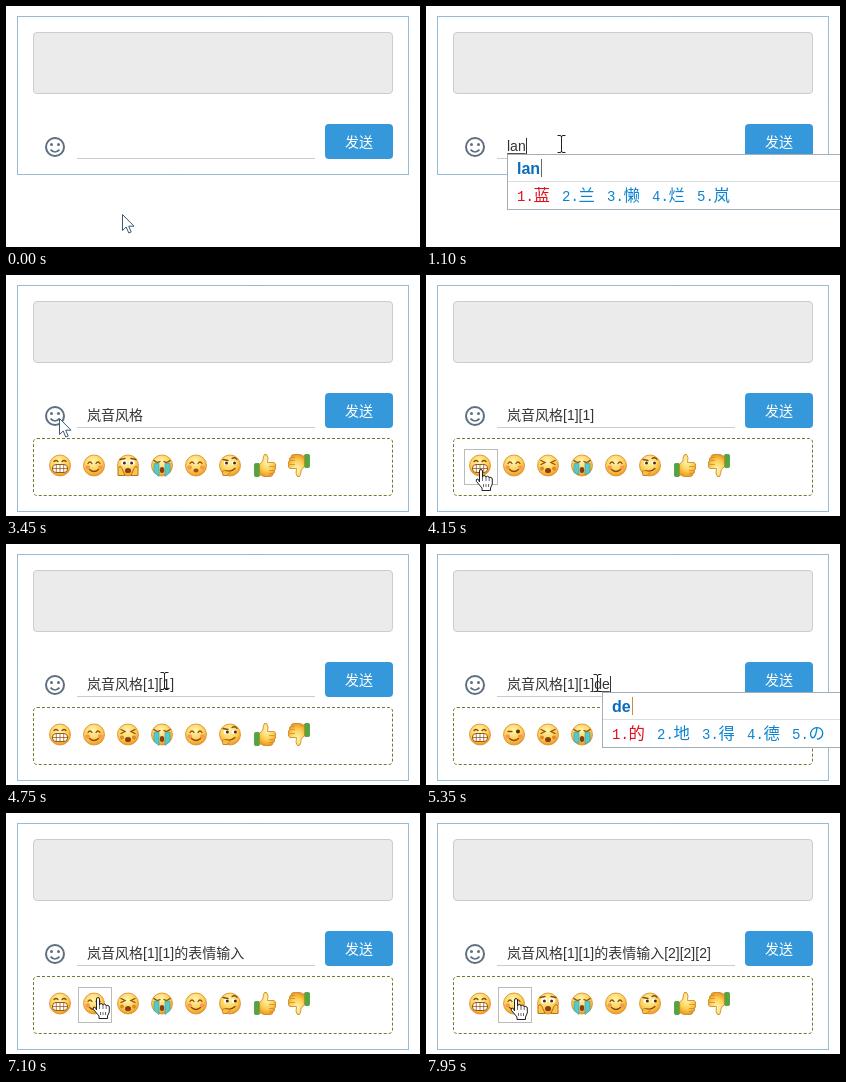
These frames come from a looping animation (414x241 px, 8 s). An HTML page:

```html
<!DOCTYPE html>
<html lang="zh-CN">
<head>
<meta charset="utf-8">
<style>
  html, body { margin: 0; width: 100%; height: 100%; overflow: hidden; background: #fff; }
  svg { display: block; width: 414px; height: 241px; }
  text { white-space: pre; }
  .input, .send { font: 14px "Liberation Sans", "Noto Sans CJK SC", "Noto Sans CJK", sans-serif; }
  .pinyin { font: bold 16px "Liberation Sans", sans-serif; fill: #0a6cbc; }
  .digit { font: 14px "Liberation Mono", monospace; }
  .word { font: 16.4px "Noto Sans CJK SC", "Noto Sans CJK", sans-serif; font-weight: 300; }
  .line { fill: none; stroke-linecap: round; stroke: #8a4b0c; stroke-width: 1.3; }
</style>
</head>
<body>
<svg viewBox="0 0 414 241" xmlns="http://www.w3.org/2000/svg">
  <defs>
    <radialGradient id="skin" cx="45%" cy="32%" r="68%">
      <stop offset="0" stop-color="#fff6b4"/>
      <stop offset=".6" stop-color="#fdd158"/>
      <stop offset="1" stop-color="#ed9a24"/>
    </radialGradient>
  </defs>
  <rect id="frame" x="11.5" y="10.5" width="391" fill="none" stroke="#2f77a8" stroke-dasharray="1 1"/>
  <rect x="27.5" y="26.5" width="359" height="61" rx="3.5" fill="#ebebeb" stroke="#ccc"/>
  <rect x="319" y="118" width="68" height="35" rx="4" fill="#3498db"/>
  <text class="send" x="339" y="141" fill="#fff">发送</text>
  <path d="M71 152.5H309" stroke="#ccc"/>
  <g transform="translate(49 141)" fill="none" stroke="#5d6f80" stroke-width="2">
    <circle r="9"/>
    <path d="M-4.5 2.6Q0 7.4 4.5 2.6" stroke-width="1.7"/>
    <g fill="#5d6f80" stroke="none"><circle cx="-3.5" cy="-2.5" r="1.5"/><circle cx="3.5" cy="-2.5" r="1.5"/></g>
  </g>
  <text id="typed" class="input" x="81" y="145" fill="#333"></text>
  <path id="underline" stroke="#555"/>
  <path id="caret" stroke="#333"/>
  <g id="panel">
    <rect x="27.5" y="163.5" width="359" height="57" rx="3.5" fill="none" stroke="#77772f" stroke-dasharray="3 2"/>
    <g id="faces"></g>
    <rect id="hover" y="174.5" width="33" height="35" fill="none" stroke="#777" stroke-dasharray="1 1"/>
  </g>
  <g id="ime">
    <rect x=".5" y="148.5" width="420" height="55" fill="#fff" stroke="#a3afb8"/>
    <path d="M1 175.5H420" stroke="#ddd"/>
    <text id="pinyin" class="pinyin" x="10" y="168"></text>
    <path id="imeCaret"/>
    <g id="words"></g>
  </g>
  <g id="cursor"></g>
</svg>
<script>
const LOOP = 8000, STEP = 50, PANEL_OPEN = 3300, CELL = 34;
const $ = id => document.getElementById(id);
const set = (id, attrs) => { for (const k in attrs) $(id).setAttribute(k, attrs[k]); };
const show = (id, on) => set(id, { display: on ? 'inline' : 'none' });

// Each phrase: spelling, first key, last key, commit time, popup position, candidates
const phrases = [
  { spell: "lan'yin", from: 950, to: 1300, done: 1400, x: 81, caret: '#667',
    first: '蓝 兰 懒 烂 岚', full: '岚音 兰因 蓝印 揽引 蓝银' },
  { spell: "feng'ge", from: 1450, to: 1800, done: 1950, x: 109, caret: '#6b5a8c',
    first: '风 封 峰 疯 丰', full: '风格 峰哥 锋哥 风哥 枫哥' },
  { spell: 'de', from: 5250, to: 5300, done: 5450, x: 176, caret: '#d08a3c',
    first: '的 地 得 德 の', full: '' },
  { spell: "biao'qing", from: 5500, to: 5900, done: 5980, x: 182, caret: '#667',
    first: '表 标 彪 飙 镖', full: '表情 标清 表请 彪清 标青' },
  { spell: "shu'ru", from: 6000, to: 6270, done: 6400, x: 210, caret: '#e02828',
    first: '数 书 树 输 属', full: '输入 数日 熟人 输热 书人' }
];
const commits = [[1400, '岚音'], [1950, '风格'], [3850, '[1]'], [4050, '[1]'], [5450, '的'],
  [5980, '表情'], [6400, '输入'], [7400, '[2]'], [7600, '[2]'], [7800, '[2]']];
const caretOn = [[450, 2350], [2850, 3300], [4850, 6200], [6300, 6850]];
const track = [[50, 116, 208], [300, 129, 150], [420, 135, 121], [650, 135, 138], [2450, 135, 138],
  [2950, 62, 147], [3100, 62, 147], [3200, 53, 143], [3500, 53, 143], [3700, 55, 194],
  [4250, 55, 194], [4450, 34, 150], [4600, 90, 129], [4800, 171, 139], [6500, 171, 139],
  [6800, 128, 160], [7150, 90, 185], [8000, 90, 185]];

function pointerAt(t) {
  const i = track.findIndex(k => k[0] > t);
  if (i <= 0) return track[i ? track.length - 1 : 0].slice(1);
  const [a, b] = [track[i - 1], track[i]];
  const p = (t - a[0]) / (b[0] - a[0]), e = p * p * (3 - 2 * p);
  return [1, 2].map(k => Math.round(a[k] + (b[k] - a[k]) * e));
}

const shapes = {
  arrow: '<path d="M.5 .5V16.5L4.2 13 6.8 19 9.2 18 6.7 12.2H12Z" fill="#fff" stroke="#3b5874"/>',
  beam: '<path d="M-3.5-8.5H-1Q.5-8.5.5-7Q.5-8.5 2-8.5H4.5M.5-7V7M-3.5 8.5H-1Q.5 8.5.5 7Q.5 8.5 2 8.5H4.5" fill="none" stroke="#222"/>',
  hand: '<path d="M-1.5 13V2Q-1.5.5 0 .5T1.5 2V8Q1.5 6.5 3.2 6.6T5 8.3Q5 7 6.6 7.2T8.2 9Q8.5 8 9.9 8.4T11.3 10V15L9.5 19V21.5H1V19L-4.5 12.5Q-5.5 10.6-4 10T-1.5 13Z" fill="#fff" stroke="#222" stroke-linejoin="round"/><path d="M1.5 8V12M5 8.5V12M8.2 9V12M2.5 15V18M5 15V18M7.5 15V18" stroke="#444" stroke-width=".8"/>'
};

const line = (d, extra = '') => `<path class="line" d="${d}" ${extra}/>`;
const dot = (x, y, r, fill) => `<circle cx="${x}" cy="${y}" r="${r}" fill="${fill}"/>`;
const pair = (x, y, r, fill) => dot(-x, y, r, fill) + dot(x, y, r, fill);
const ball = `<circle r="10.5" fill="url(#skin)" stroke="#d98a20" stroke-width=".8"/>`;
const blush = pair(6.3, 2, 2.3, '#f59a55');
const closedEyes = line('M-6-2Q-4-5-2-2M2-2Q4-5 6-2');
const smile = line('M-4.5 4Q0 8 4.5 4');

const faces = [
  () => ball + line('M-6-4Q-4-6-2-4M2-4Q4-6 6-4') +
    '<rect x="-7.5" y="-1" width="15" height="8" rx="3.5" fill="#fff" stroke="#9b5912"/>' +
    line('M-7 3H7M-3.7-.5V6.5M0-.5V6.5M3.7-.5V6.5', 'style="stroke-width:.7"'),
  t => {
    const wink = t % 700 >= 350 && t % 700 < 550;
    return ball + blush + (wink ? line('M-6-3H-2') + dot(4, -3, 2, '#5b300a') : closedEyes) + smile;
  },
  t => {
    const eyes = pair(4, -3, 2.9, '#fff') + pair(3.6, -2.6, 1.5, '#4d2a0c') + line('M-8-6L-3-7M8-6L3-7');
    const hands = '<path d="M-10 10V3Q-8-1-6 3L-3 10ZM10 10V3Q8-1 6 3L3 10Z" fill="#fbc64c" stroke="#b87018"/>';
    const mouth = '<ellipse cy="5" rx="3" ry="2.6" fill="#8a3d12"/>';
    return ball + (t % 600 < 500 ? eyes + mouth + hands : line('M-7-5L-3-3-7-1M7-5L3-3 7-1') + pair(6, 3, 2, '#d98a2c') + mouth);
  },
  t => {
    const drop = t % 400 < 200 ? 9 : 11;
    return ball + line('M-8-5Q-5-2-2-4M8-5Q5-2 2-4') +
      `<path d="M-8-2H-3V${drop}L-8 7ZM8-2H3V${drop}L8 7Z" fill="#58c9cb" stroke="#2fa0a8" stroke-width=".6"/>` +
      '<ellipse cy="4.5" rx="2.2" ry="3" fill="#8a3d12"/>';
  },
  t => ball + blush + closedEyes +
    (t % 600 >= 350 && t % 600 < 500 ? '<ellipse cy="5" rx="2.5" ry="2" fill="#a34f18"/>' : smile),
  t => {
    const look = t % 800 < 600 ? 0 : .8;
    return ball + pair(4, -2.5, 2.3, '#fff') + dot(-3.5 + look, -2.5, 1.5, '#4d2a0c') +
      dot(4.5 + look, -2.5, 1.5, '#4d2a0c') + line('M-7-6L-2-5M2-7Q5-9 7-6M-4 5Q1 7 5 3') +
      '<path d="M-7 10Q-9 5-5 5L-1 6Q1 7-1 8L-3 10Z" fill="#f9bd45" stroke="#b87018" stroke-width=".8"/>';
  },
  t => thumb(0, t),
  t => thumb(180, t)
];

function thumb(turn, t) {
  const bob = t % 600 >= 250 && t % 600 < 350 ? -1 : 0;
  return `<g transform="rotate(${turn}) translate(0 ${bob})">
    <rect x="-10.5" y="-2" width="5" height="13" rx="1" fill="#4fa83d" stroke="#35822a" stroke-width=".6"/>
    <path d="M-5.5-1Q-1-4-1.5-9Q-1-12 1.5-11Q4-9 2.5-3H9Q11.5-2 10.5 1Q11 4 9.5 5Q10 8 8 8Q8 11 5 11H-1L-5.5 9Z" fill="url(#skin)" stroke="#c9811d" stroke-width=".8"/>
    <path d="M4 1H10M4 5H9.5M4 8H8" stroke="#d0902c" stroke-width=".8"/></g>`;
}

function spellingAt(p, t) {
  const total = p.spell.replace("'", '').length;
  const count = Math.min(total, 1 + Math.floor((t - p.from) / (p.to - p.from) * (total - 1) + .001));
  const split = p.spell.indexOf("'");
  return p.spell.slice(0, split >= 0 && count > split ? count + 1 : count);
}

function drawIme(p, spell) {
  show('ime', !!p);
  if (!p) return;
  set('ime', { transform: `translate(${p.x} 0)` });
  $('pinyin').textContent = spell;
  const x = Math.round(10 + $('pinyin').getComputedTextLength()) + 1.5;
  set('imeCaret', { d: `M${x} 153V171`, stroke: p.caret });
  const list = (spell.includes("'") ? p.full : p.first).split(' ');
  const pitch = 28.6 + 16.4 * list[0].length;
  $('words').innerHTML = list.map((w, i) =>
    `<g transform="translate(${10 + i * pitch} 195)" fill="${i ? '#0a84d0' : '#e0101c'}">` +
    `<text class="digit">${i + 1}.</text><text class="word" x="16.4">${w}</text></g>`).join('');
}

function drawInput(t) {
  const p = phrases.find(p => t >= p.from && t < p.done);
  const spell = p ? spellingAt(p, t) : '';
  const text = commits.filter(c => c[0] <= t).map(c => c[1]).join('');
  const typed = $('typed');
  typed.textContent = text;
  const start = text ? typed.getComputedTextLength() : 0;
  typed.textContent = text + spell.replace("'", '');
  const end = 81 + (typed.textContent ? typed.getComputedTextLength() : 0);
  set('underline', { d: p ? `M${81 + start} 147.5H${end}` : 'M0 0' });
  set('caret', { d: `M${Math.round(end) + .5} 132V148` });
  show('caret', caretOn.some(([a, b]) => t >= a && t < b));
  drawIme(p, spell);
}

function render(t) {
  const open = t >= PANEL_OPEN, [x, y] = pointerAt(t);
  set('frame', { height: open ? 226 : 158 });
  show('panel', open);
  if (open) $('faces').innerHTML = faces.map((face, i) =>
    `<g transform="translate(${54 + i * CELL + (i > 5 ? 1 : 0)} 190.5)">${face(t)}</g>`).join('');
  const cell = Math.floor((x - 38) / CELL);
  const over = open && cell >= 0 && cell < faces.length && y >= 174 && y < 210;
  show('hover', over);
  set('hover', { x: 38.5 + cell * CELL });
  drawInput(t);
  const inInput = x >= 71 && x < 309 && y >= 118 && y < 153;
  $('cursor').innerHTML = shapes[over ? 'hand' : inInput ? 'beam' : 'arrow'];
  set('cursor', { transform: `translate(${x} ${y})` });
}

const began = performance.now();
function tick() {
  const t = (performance.now() - began) % LOOP;
  render(Math.floor(t / STEP) * STEP);
  requestAnimationFrame(tick);
}
tick();
</script>
</body>
</html>
```
